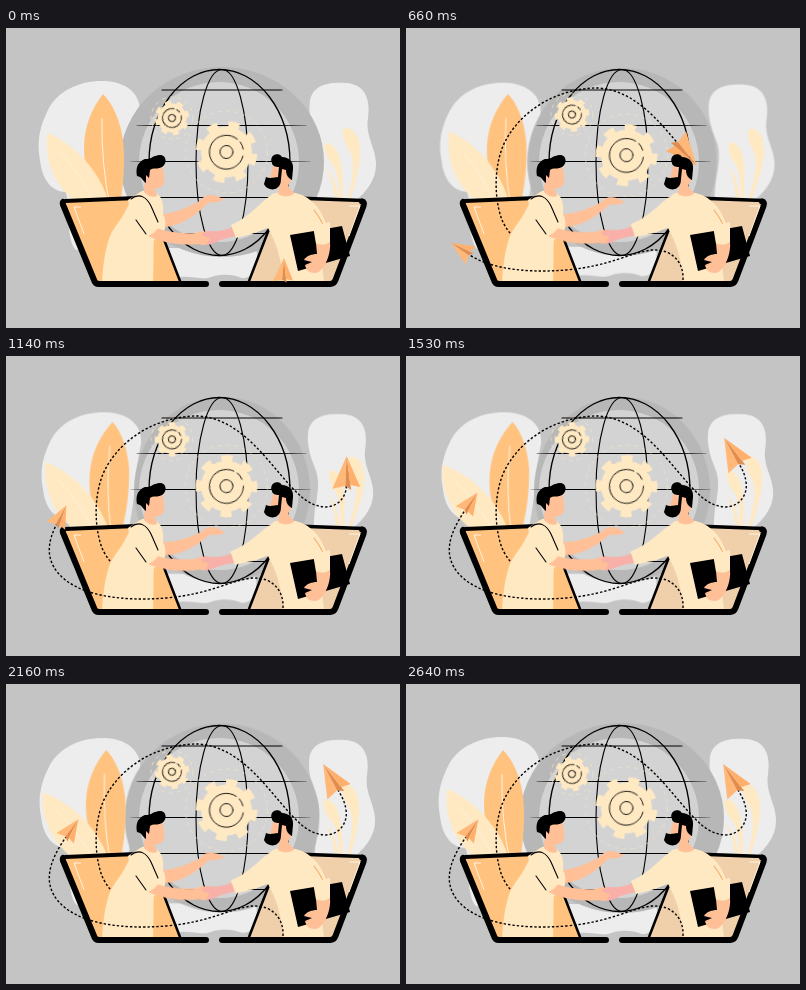
Recreate the animation shown at these times as an HTML page. Size 394 by 300 pixels, loop 2670 ms.

```html
<!DOCTYPE html>
<html lang="en">
<head>
<meta charset="utf-8">
<title>Remote handshake</title>
<style>
  html, body { margin: 0; width: 100%; height: 100%; overflow: hidden; background: #c4c4c4; }
  svg { display: block; width: 394px; height: 300px; }

  .blob { fill: #ededed; }
  .cream { fill: #ffe9c3; }
  .orange { fill: #ffc37f; }
  .skin { fill: #ffbf97; }
  .pink { fill: #f8b0a8; }
  .line { fill: none; stroke: #000; stroke-width: 1.1; stroke-linecap: round; }
  .thin { stroke-width: .9; }
  .vein { fill: none; stroke: #fff3dc; stroke-width: 1; }
  .frame { fill: none; stroke: #000; stroke-width: 6; stroke-linecap: round; stroke-linejoin: round; }
  .ring { fill: none; stroke: #f3e4c8; stroke-width: 1; stroke-dasharray: 4 4; opacity: .75; }
  .teeth { fill: none; stroke: #ffe9c3; stroke-dasharray: 1 1; }

  /* Everything that sways goes out and back once per loop. */
  .sway {
    transform-origin: var(--o, 0 0);
    animation: sway 2670ms cubic-bezier(.37, 0, .63, 1) var(--delay, 0ms) infinite;
  }
  @keyframes sway {
    0%, 100% { transform: var(--from, none); }
    50% { transform: var(--to); }
  }

  .over { --p: path("M125 228C112 214 101 204 96 192C88 170 88 140 97 118C112 84 150 60 192 60C228 62 252 92 274 118C288 134 300 150 319 151C334 151 342 138 340 126C339 118 336 113 332 106"); }
  .under { --p: path("M277 252C278 234 266 221 246 222C222 225 205 238 160 242C110 246 70 238 52 217C38 200 41 180 60 153"); }
  .dots, .wipe { d: var(--p); fill: none; }
  .dots { stroke: #000; stroke-width: 1.4; stroke-dasharray: 2.4 2; }
  .wipe, .fly { animation: wipe 2670ms cubic-bezier(.25, .5, .35, 1) infinite; }
  .wipe { stroke: #fff; stroke-width: 6; stroke-dasharray: 1 2; }
  .fly { offset-path: var(--p); offset-rotate: auto; transform-origin: 0 0; animation-name: fly; }
  @keyframes wipe { 0% { stroke-dashoffset: 1; } 63.7%, 100% { stroke-dashoffset: 0; } }
  @keyframes fly { 0% { offset-distance: 0%; } 63.7%, 100% { offset-distance: 100%; } }
</style>
</head>
<body>
<svg viewBox="0 0 394 300">
  <defs>
    <mask id="wipeOver" maskUnits="userSpaceOnUse" x="0" y="0" width="394" height="300">
      <path class="over wipe" pathLength="1"/>
    </mask>
    <mask id="wipeUnder" maskUnits="userSpaceOnUse" x="0" y="0" width="394" height="300">
      <path class="under wipe" pathLength="1"/>
    </mask>
    <linearGradient id="fade" gradientUnits="userSpaceOnUse" x1="125" y1="0" x2="304" y2="0">
      <stop offset="0" stop-opacity=".2"/>
      <stop offset=".15"/>
      <stop offset=".82"/>
      <stop offset="1" stop-opacity=".2"/>
    </linearGradient>
    <g id="plane">
      <path fill="#ffb878" d="M30 0L-3-14L0-1Z"/>
      <path fill="#e28d50" d="M30 0L0-1L-4 5L2 4Z"/>
      <path fill="#ffb06c" d="M30 0L1 4L-1 14Z"/>
    </g>
  </defs>

  <!-- backdrop -->
  <g class="blob sway" style="--o:202px 150px;--to:scale(.982,.965)">
    <path d="M42 82C52 62 75 52 99 53C122 54 138 68 133 90C128 112 128 140 122 170L110 222L70 222C60 212 64 182 60 164C46 164 36 152 34 132C30 112 35 96 42 82Z"/>
    <path d="M304 72C308 55 326 54 340 55C358 56 365 70 362 90C359 108 370 120 370 136C370 154 358 166 346 176L310 176C308 150 318 134 312 114C306 98 302 88 304 72Z"/>
    <path d="M160 220L250 220C254 240 248 250 236 250C226 246 218 246 208 248C196 254 186 246 168 250Z"/>
  </g>
  <ellipse class="sway" style="--o:216px 134px;--to:scale(.855,.98)" cx="216" cy="134" rx="102" ry="95" fill="#b7b7b7"/>

  <!-- leaves -->
  <g class="sway" style="--o:104px 195px;--to:rotate(4.5deg)">
    <path class="orange" d="M97 66C86 80 78 98 78 120C78 145 88 165 96 180L113 180C118 158 119 132 117 112C114 92 107 76 97 66Z"/>
    <path class="vein" d="M96 90Q95 135 104 178"/>
  </g>
  <g class="sway" style="--o:100px 185px;--delay:-854ms;--from:rotate(-4deg);--to:rotate(2deg)">
    <path class="cream" d="M41 105C38 130 46 156 70 174L104 182C100 154 76 120 41 105Z"/>
    <path class="vein" stroke-opacity=".8" d="M52 122Q72 142 90 178"/>
  </g>
  <g class="sway" style="--o:335px 178px;--delay:-400ms;--from:rotate(-2deg);--to:rotate(4deg)">
    <path class="cream" d="M338 101C346 98 353 106 354 116C357 130 352 146 344 176L341 176C347 150 350 136 345 124C340 116 337 108 338 101Z"/>
    <path class="cream" d="M320 115C328 115 333 122 335 134C337 148 338 160 337 176L334 176C334 160 333 148 328 138C321 130 318 122 320 115Z"/>
    <path class="cream" d="M320 140Q332 150 333 176L329 176Q329 154 320 140Z"/>
  </g>

  <!-- globe -->
  <circle cx="213" cy="134" r="80" fill="#d3d3d3"/>
  <g class="line">
    <ellipse cx="213.500" cy="134.500" rx="70.500" ry="93" stroke-width="1.300"/>
    <ellipse cx="216" cy="134.500" rx="26" ry="93"/>
    <path stroke="url(#fade)" d="M156 62H276M131 97.500H300M125 133.500H304M142 169.500H290M154 205.500H272"/>
  </g>

  <!-- gears -->
  <g class="sway" style="--to:translateY(6.5px)">
    <g transform="translate(220.500 124)">
      <circle class="ring" r="41"/>
      <g class="sway" style="--from:rotate(4deg);--to:rotate(-11deg)">
        <circle class="cream" r="25.500"/>
        <circle class="teeth" r="27.500" stroke-width="7" pathLength="16"/>
        <path class="line thin" d="M10-13.500A17 17 0 1 0 16.700 3M16.500-4A17 17 0 0 0 13-11"/>
        <circle class="line thin" r="6.500"/>
      </g>
    </g>
  </g>
  <g class="sway" style="--to:translateY(-7px)">
    <g transform="translate(166 90)">
      <circle class="ring" r="21"/>
      <g class="sway" style="--from:rotate(-26deg);--to:rotate(-11deg)">
        <circle class="cream" r="14.500"/>
        <circle class="teeth" r="15.300" stroke-width="4" pathLength="16"/>
        <path class="line thin" d="M6-7.500A9.600 9.600 0 1 0 9.400 2M9.300-2A9.600 9.600 0 0 0 8-5.400"/>
        <circle class="line thin" r="3.600"/>
      </g>
    </g>
  </g>

  <!-- laptops -->
  <path class="orange" d="M58 174L142 170L175 254H92Z"/>
  <path class="line" stroke-width="3" style="stroke-width:2.500" d="M142 170L174 253"/>
  <path class="frame" d="M57 174Q56 175 58 179L88 252Q89 256 93 256H200"/>
  <path class="frame" style="stroke-width:4" d="M142 169.500L59 173Q56 173 57 176"/>
  <path class="vein" d="M75 179L68 179L78 206"/>
  <path fill="#efd0ab" d="M275 170L358 174L327 254H242Z"/>
  <path class="line" style="stroke-width:2.500" d="M275 170L243 253"/>
  <path class="frame" d="M216 256H324Q328 256 329.500 252L357.500 178Q359 174 356 173.500"/>
  <path class="line" style="stroke-width:3.500" d="M275 169.500L357 172.500"/>
  <path class="vein" d="M343 178L354 178L343 208"/>

  <!-- upper flight -->
  <g mask="url(#wipeOver)"><path class="over dots"/></g>
  <g class="over fly"><use href="#plane"/></g>

  <!-- left person -->
  <g class="sway" style="--o:155px 192px;--to:rotate(5deg)">
    <path class="skin" d="M150 186C166 187 182 180 195 172C198 167 204 166 210 168L218 171C213 175 207 174 202 175C190 187 176 198 154 200Z"/>
  </g>
  <path class="cream" d="M139 162C128 165 124 174 119 184C114 194 106 200 102 214C98 228 97 240 96 253H147C148 236 147 222 148 212L158 204C160 198 160 192 157 186C158 176 156 169 151 166Z"/>
  <path class="skin" d="M142 141L156 137C157 144 160 150 157 157C155 160 152 160 149 160L151 168C146 170 142 168 138 164L139 148Z"/>
  <path d="M131 148C129 139 133 133 139 131C144 132 149 126 155 127C161 128 161 136 156 139C151 142 147 139 144 142L143 150L140 147L140 155C136 152 136 149 131 148Z"/>
  <g class="sway" style="--o:145px 203px;--to:rotate(-3deg)">
    <path class="skin" d="M143 196C156 204 174 206 190 205C198 201 205 205 206 209C207 215 200 219 193 216C176 218 156 215 140 207Z"/>
  </g>
  <path class="cream" d="M122 172C132 164 141 168 145 178L154 196C151 203 146 207 140 209C132 202 125 190 122 172Z"/>
  <path class="line" d="M125 171C134 164 141 170 145 178L152 194M140 206L130 192"/>

  <!-- right person -->
  <g class="sway" style="--o:255px 185px;--to:rotate(3deg)">
    <path class="pink" d="M230 197C220 203 210 204 201 203L196 206C197 210 201 209 204 210C203 213 200 215 202 217C208 216 213 212 218 211L233 207Z"/>
    <path class="cream" d="M268 165C253 175 244 189 225 197L230 210C247 206 258 202 270 196Z"/>
  </g>
  <path class="cream" d="M267 166C278 162 295 164 304 172C316 181 322 196 324 214L314 222L318 253H277C276 232 270 214 262 200Z"/>
  <path class="skin" d="M264 149L268 136L281 137L285 142C287 149 284 154 282 158L288 166C281 170 275 168 272 166L273 160L264 157Z"/>
  <path d="M266 135A5 5 0 0 1 276 129C283 129 288 134 287 141L286 152C282 150 280 147 280 142L276 141L275 151C275 155 274 158 271 160C267 163 260 161 258 156L260 149C264 151 269 149 272 149L273 139C270 139 266 138 266 135Z"/>
  <path class="line" stroke="#f3a866" style="stroke:#f3a866" d="M308 182Q317 193 320 206"/>
  <path d="M284 207L308 203L336 198L344 228L292 243Z"/>
  <path class="cream" d="M307 198L324 194L324 216Q316 220 310 216Z"/>
  <path class="skin" d="M310 215Q317 219 324 214C325 224 321 236 314 243C307 248 300 243 299 237L306 234L298 232C300 228 306 226 311 226Z"/>

  <!-- lower flight -->
  <g mask="url(#wipeUnder)"><path class="under dots"/></g>
  <g class="under fly"><use href="#plane" transform="scale(.72)"/></g>
</svg>
</body>
</html>
```
